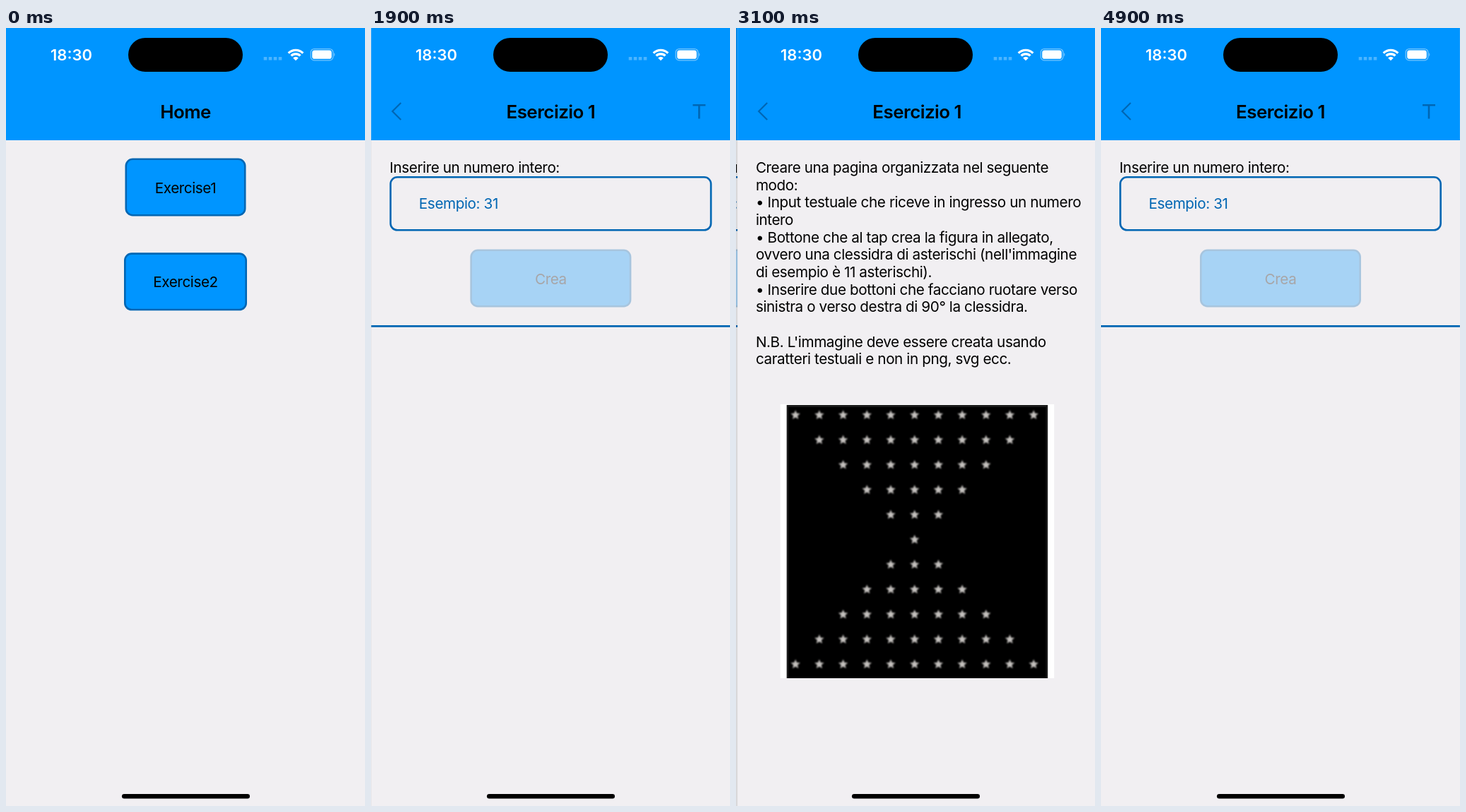
Recreate the animation shown at these times as an HTML page. Size 508x1102 px, loop 5 s.

```html
<!DOCTYPE html>
<html lang="it">
<head>
<meta charset="utf-8">
<title>Esercizi</title>
<style>
  html, body { margin: 0; width: 100%; height: 100%; overflow: hidden; background: #f1eff2; }
  svg { display: block; width: 100%; height: 100%; }
  text { font: 20.7px Inter, "Open Sans", sans-serif; letter-spacing: -.02em; white-space: pre; }
  .title { font-size: 25.9px; font-weight: 600; }
  .mid { text-anchor: middle; }
  .line { fill: none; stroke: #0066b3; stroke-width: 2.6; }
  .button { fill: #0095ff; stroke: #0066b3; stroke-width: 2.6; }
</style>
</head>
<body>
<svg viewBox="0 0 508 1102">
  <defs>
    <filter id="soft"><feGaussianBlur stdDeviation="1"/></filter>
    <path id="back" class="line" d="M42 106L30 118L42 130" style="stroke-width:2.2"/>
  </defs>
  <g id="home"></g>
  <g id="form"></g>
  <g id="task"></g>
  <g id="status" fill="#fff">
    <text x="63" y="46" style="font-size:22px;font-weight:600;letter-spacing:0">18:30</text>
    <rect x="173" y="14" width="162" height="48" rx="24" fill="#000"/>
    <path d="M367 41v4.5M374 41v4.5M381 41v4.5M388 41v4.5" stroke="#fff" stroke-width="4.6" opacity=".3"/>
    <g fill="none" stroke="#fff" stroke-width="3.3">
      <path d="M399.7 35.6A14.6 14.6 0 0 1 420.3 35.6"/>
      <path d="M403.6 39.4A9 9 0 0 1 416.4 39.4"/>
    </g>
    <path d="M410 46.2L406.2 42.4A5.4 5.4 0 0 1 413.8 42.4Z"/>
    <rect x="431.2" y="29.6" width="31.6" height="16.2" rx="5" fill="none" stroke="#fff" stroke-width="1.3" opacity=".45"/>
    <rect x="433.2" y="31.6" width="27.6" height="12.2" rx="3.4"/>
    <path d="M464.2 35Q466.4 37.7 464.2 40.4Z" opacity=".5"/>
    <rect x="164" y="1085" width="181" height="6.5" rx="3.2" fill="#000"/>
  </g>
</svg>
<script>
const W = 508, LOOP = 5000, STEP = 100;
const $ = id => document.getElementById(id);

const text = (x, y, s, cls = '') => `<text x="${x}" y="${y}" class="${cls}">${s}</text>`;

const button = (id, label, y, w, opacity = 1) => `<g id="${id}" opacity="${opacity}">
  <rect class="button" x="${254 - w / 2}" y="${y}" width="${w}" height="79.4" rx="9.5"/>
  ${text(254, y + 47.7, label, 'mid')}</g>`;

const page = (title, body) => `<rect width="508" height="1102" fill="#f1eff2"/>
  <rect width="508" height="159" fill="#0095ff"/>
  ${text(254, 127.5, title, 'title mid')}${body}
  <rect class="dim" width="508" height="1102" opacity="0"/>`;

function starPath(cx, cy) {
  const points = Array.from({length: 10}, (_, i) => {
    const r = i % 2 ? 3.2 : 7, a = (i / 5 - .5) * Math.PI;
    return `${(cx + r * Math.cos(a)).toFixed(1)} ${(cy + r * Math.sin(a)).toFixed(1)}`;
  });
  return `M${points.join('L')}Z`;
}

function hourglass() {
  let d = '';
  for (let row = 0; row < 11; row++) {
    const inset = Math.min(row, 10 - row);
    for (let col = inset; col <= 10 - inset; col++) d += starPath(82 + 33.7 * col, 548.3 + 35.3 * row);
  }
  return `<rect x="60.5" y="533" width="387.5" height="388" fill="#fff"/>
    <rect x="69.5" y="534" width="369.5" height="387" fill="#1a1a1a"/>
    <rect x="72" y="537" width="364.5" height="384"/>
    <path d="${d}" fill="#c4c1be" filter="url(#soft)"/>`;
}

const lines = [
  'Creare una pagina organizzata nel seguente', 'modo:',
  '• Input testuale che riceve in ingresso un numero', 'intero',
  '• Bottone che al tap crea la figura in allegato,',
  "ovvero una clessidra di asterischi (nell'immagine", 'di esempio è 11 asterischi).',
  '• Inserire due bottoni che facciano ruotare verso',
  'sinistra o verso destra di 90° la clessidra.', '',
  "N.B. L'immagine deve essere creata usando", 'caratteri testuali e non in png, svg ecc.'
];

$('home').innerHTML = page('Home',
  button('first', 'Exercise1', 185.8, 168.4) + button('second', 'Exercise2', 319.6, 171.4));

$('form').innerHTML = page('Esercizio 1', `<use href="#back"/>
  <path id="info" class="line" d="M455 109.3H473M464 109.3V128.5"/>
  ${text(26, 205, 'Inserire un numero intero:')}
  <rect class="line" x="27.3" y="211.3" width="453.4" height="75" rx="9.5"/>
  <g fill="#0066b3">${text(67.5, 256, 'Esempio: 31')}</g>
  ${button('make', 'Crea', 314.8, 225.4, .3)}
  <path class="line" d="M0 422.4H508"/>`);

$('task').innerHTML = page('Esercizio 1', '<use id="leave" href="#back"/>' +
  lines.map((s, i) => text(25.7, 205 + 24.68 * i, s)).join('') + hourglass());

// Critically damped spring from 0 to 1
function slide(t, start) {
  const u = Math.max(0, t - start) * .01826;
  return 1 - (1 + u) * Math.exp(-u);
}

// Touch feedback: drops at once, eases back after release
function touch(t, down, up) {
  if (t < down) return 1;
  const p = Math.min(1, Math.max(0, (t - up) / 250));
  return .2 + .8 * (p < .5 ? 2 * p * p : 1 - 2 * (1 - p) ** 2);
}

function place(id, x, dim) {
  $(id).setAttribute('transform', `translate(${x.toFixed(2)})`);
  $(id).querySelector('.dim').setAttribute('opacity', dim);
}

function draw(now) {
  const t = Math.floor(now % LOOP / STEP) * STEP;
  const open = slide(t, 1372), read = slide(t, 2684) - slide(t, 4290);
  place('home', -.3 * W * open, .1 * open);
  place('form', W * (1 - open) - .3 * W * read, t < 4200 ? .1 * read : 0);
  place('task', W * (1 - read), 0);
  $('first').setAttribute('opacity', touch(t, 1200, 1360));
  $('info').setAttribute('opacity', touch(t, 2600, 2670));
  $('leave').setAttribute('opacity', touch(t, 4200, 4275));
}

const begin = performance.now();
function tick() {
  draw(performance.now() - begin);
  requestAnimationFrame(tick);
}
tick();
</script>
</body>
</html>
```
